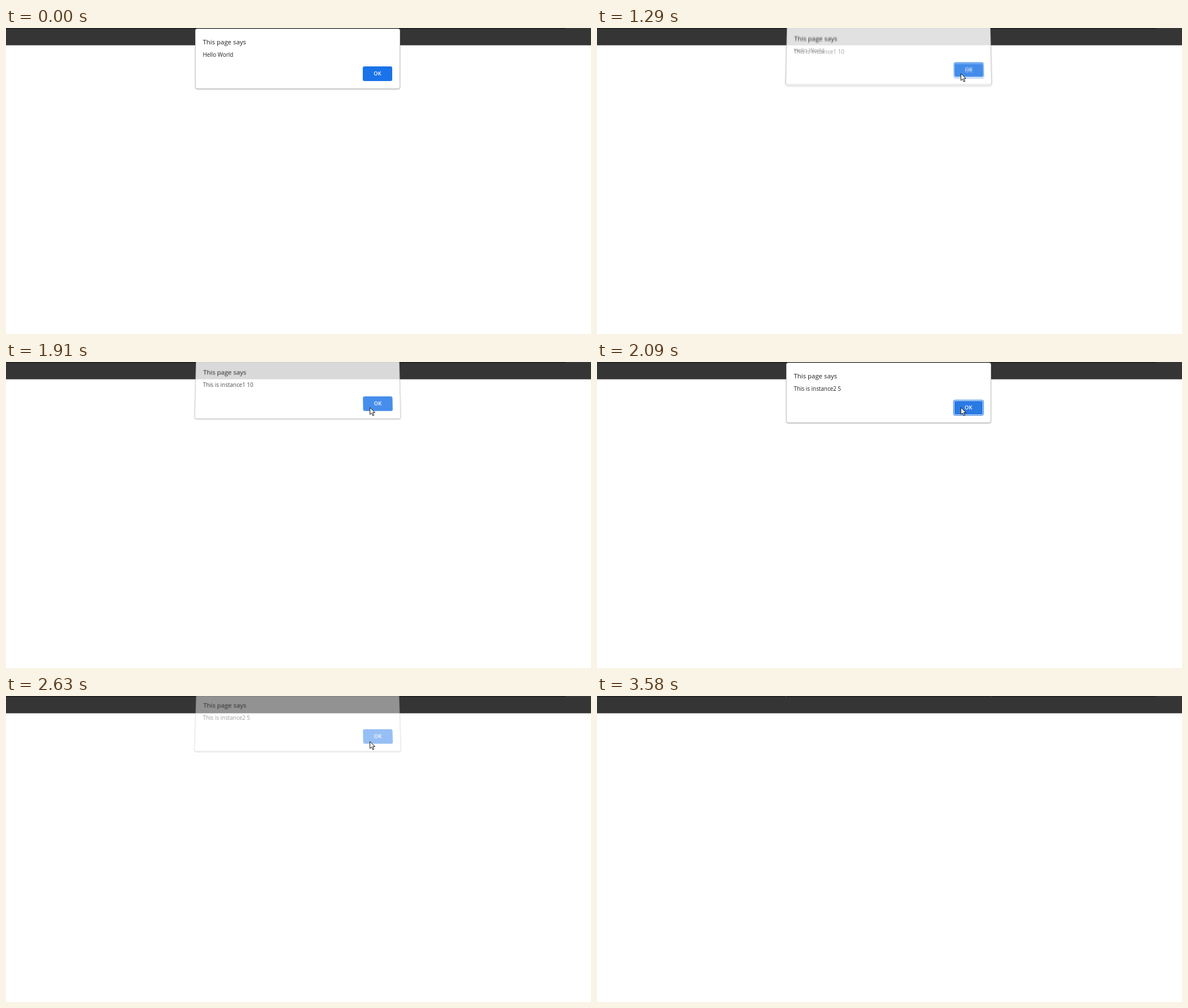
Recreate the animation shown at these times as an HTML page. Size 1033 px wide and 542 px high, loop 4.49 s.

```html
<!DOCTYPE html>
<html lang="en">
<head>
<meta charset="utf-8">
<title>Alert dialogs</title>
<style>
  html, body { margin: 0; width: 100%; height: 100%; overflow: hidden; background: #fff; }
  div, svg, p, b { position: absolute; margin: 0; white-space: nowrap; }
  #bar { left: 0; top: 0; width: 100%; height: 30px; background: #353535; border-bottom: 1px solid #857f82; }
  #strip { left: 0; top: 0; width: 988px; height: 1px; background: #1c1c1c; border-bottom: 1px solid #292929; }
  .tick { top: 0; width: 1px; height: 2px; background: #505050; }
  .dialog {
    left: 335px; top: 2px; width: 360px; height: 105px;
    background: #fff; border-radius: 3px;
    box-shadow: 0 0 0 1px #c4c4c4, 0 1px 3px rgba(0, 0, 0, .5);
    font-family: "Open Sans", "Noto Sans", sans-serif; color: #202124;
  }
  .title { left: 12.5px; top: 14.5px; font-size: 11.4px; line-height: 16px; }
  .message { left: 12.5px; top: 38px; font-size: 9.9px; line-height: 15px; }
  .ok {
    left: 295px; top: 66px; width: 52px; height: 26px; border-radius: 3px;
    background: #1a73e8; color: #fff; font-size: 9.3px; font-weight: 600;
    line-height: 25.5px; text-align: center;
  }
  .ok.hover { background: #2a7ae4; }
  .ok.focus { box-shadow: inset 0 0 0 1px #fff, 0 0 0 1px #1a6fdd; }
  #cursor { left: 0; top: 0; overflow: visible; }
</style>
</head>
<body>
<div id="bar"></div>
<div id="strip"></div>
<div id="ticks">
  <div class="tick" style="left:333px"></div>
  <div class="tick" style="left:695px"></div>
</div>
<div id="dialogs"></div>
<svg id="cursor" width="11" height="17">
  <path d="M.7 .7V13l2.9-2.7 2.1 4.9 2-.9-2.1-4.7h4z" fill="#fff" stroke="#111" stroke-width="1"/>
</svg>
<script>
const LOOP = 4490;
const OPENING = 200, CLOSING = 250;
const $ = id => document.getElementById(id);
const cursor = $("cursor"), ticks = $("ticks");

const bursts = [
  [110, 550, 7], [660, 910, 4], [1220, 1440, 4], [1760, 2090, 5],
  [2450, 2700, 4], [3120, 3240, 3], [3410, 3580, 3]
];
const captures = bursts.flatMap(([first, last, count]) =>
  Array.from({ length: count }, (_, i) =>
    Math.floor((first + (last - first) * i / (count - 1)) / 10) * 10));
const held = t => captures.filter(c => c <= t).pop() ?? 0;

// Closing and opening dialogs overlap
const dialogs = [
  { text: "Hello World", opens: -OPENING, closes: 1190 },
  { text: "This is instance1 10", opens: 1240, closes: 1760, ring: true },
  { text: "This is instance2 5", opens: 1860, closes: 2450, ring: true }
];
for (const d of dialogs) {
  d.box = document.createElement("div");
  d.box.className = "dialog";
  d.box.innerHTML = `<p class="title">This page says</p><p class="message">${d.text}</p><b class="ok">OK</b>`;
  d.ok = d.box.querySelector(".ok");
  $("dialogs").append(d.box);
}

const clamp = v => Math.min(1, Math.max(0, v));
const mix = (a, b, p) => a + (b - a) * p;
const cubic = (a, b, c, d, p) => {
  const q = 1 - p;
  return a * q ** 3 + 3 * b * q * q * p + 3 * c * q * p * p + d * p ** 3;
};

function pointer(t) {
  if (t < 110) return null;
  if (t < 660) {
    const p = (t - 110) / 440;
    return [cubic(886, 700, 480, 624, p), cubic(484, 300, 95, 92, p)];
  }
  const line = (start, end, x1, y1, x2, y2) => {
    const p = clamp((t - start) / (end - start));
    return [mix(x1, x2, p), mix(y1, y2, p)];
  };
  if (t < 3120) return line(580, 910, 624, 92, 642, 80);
  if (t < 3410) return line(3120, 3240, 688, 108, 878, 504);
  return line(3330, 3580, 878, 504, 990, 556);
}

function drawDialog(d, t, at) {
  const open = clamp((t - d.opens) / OPENING);
  const since = t - d.closes;
  const closing = since >= 0;
  const alpha = closing ? 1 - .19 * (since / 80) ** 1.5 : 1 - (1 - open) ** 2;
  const tilt = closing ? 1.4 * (1 - Math.exp(-since / 64)) : 1 - open;

  d.box.style.display = open > 0 && since < CLOSING ? "" : "none";
  d.box.style.opacity = clamp(alpha);
  d.box.style.transform = tilt
    ? `perspective(1000px) translateY(${-7 * tilt}px) rotateX(${8 * tilt}deg)` : "none";
  d.ok.classList.toggle("focus", !!d.ring && !closing);
  d.ok.classList.toggle("hover", !!at && !closing && at[0] >= 630 && at[0] < 682 && at[1] < 94);
}

function draw(time) {
  const t = held(time);
  const at = pointer(t);
  for (const d of dialogs) drawDialog(d, t, at);
  ticks.style.display = t < 2700 ? "none" : "";
  cursor.style.display = at ? "" : "none";
  if (at) cursor.style.transform = `translate(${Math.round(at[0])}px, ${Math.round(at[1])}px)`;
}

const began = performance.now();
function tick() {
  draw((performance.now() - began) % LOOP);
  requestAnimationFrame(tick);
}
tick();
</script>
</body>
</html>
```
